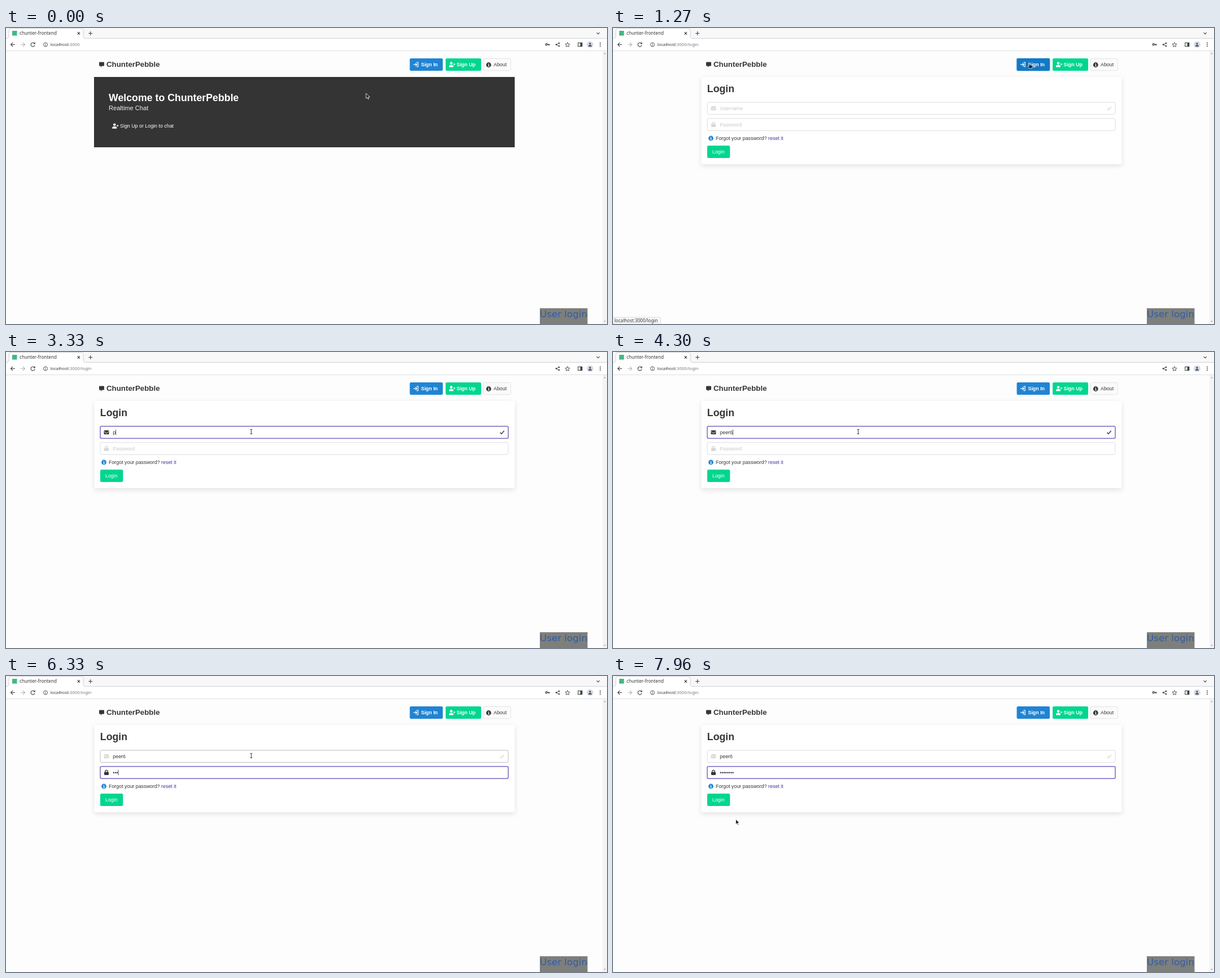
An HTML page for the animation above (7990 ms loop, 1065 by 526 pixels).

```html
<!DOCTYPE html>
<html lang="en">
<head>
<meta charset="utf-8">
<title>chunter-frontend</title>
<style>
  html, body { margin: 0; width: 100%; height: 100%; overflow: hidden; background: #fdfdfd; }
  svg { display: block; width: 100vw; height: 100vh; }
  text { font: 8.875px "Liberation Sans", Arial, sans-serif; fill: #363636; white-space: pre; }
  .ui { font-family: "Noto Sans", "Open Sans", sans-serif; }
  .b { font-weight: bold; }
  .w { fill: #fff; }
  .h1 { font-size: 17.75px; font-weight: bold; }
  .hint { fill: #c9c9c9; }
  .line { fill: none; stroke: #3c4043; stroke-width: 1.1; }
  .card { fill: #fff; filter: drop-shadow(0 3.5px 4.2px rgba(10,10,10,.11)); }
  .field { fill: #fff; }
</style>
</head>
<body>
<svg viewBox="0 0 1065 526" preserveAspectRatio="none">
  <defs>
    <g id="person">
      <circle cx="4" cy="2.3" r="2.3"/>
      <path d="M0 9.2V8.2Q0 5.4 2.8 5.4H5.2Q8 5.4 8 8.2V9.2Z"/>
    </g>
    <g id="personPlus">
      <use href="#person"/>
      <path d="M9.4 2.4V6M7.6 4.2H11.2" stroke="currentColor"/>
    </g>
    <g id="info">
      <circle r="4.4"/>
      <path d="M-1.1-.5H.3V2.3M-1.2 2.3H1.4M-.6-2.3H.6" fill="none" stroke="#fff" stroke-width="1.1"/>
    </g>
  </defs>

  <!-- browser chrome -->
  <rect width="1065" height="19" fill="#f8f8f9"/>
  <rect y="18" width="1065" height="22.5" fill="#fff"/>
  <path d="M0 18.4H1Q5 18.4 5 14V4.500Q5 .6 9 .6H133Q137 .6 137 4.500V14Q137 18.4 141 18.4H1065" fill="#fff" stroke="#c9cbd2" stroke-width=".9"/>
  <path d="M0 40.500H1065" stroke="#dcdde0"/>
  <rect x="11" y="5" width="8.500" height="8.500" fill="#41b883"/>
  <text class="ui" x="24" y="12.2" style="font-size:8.15px">chunter-frontend</text>
  <g class="line">
    <path d="M126.600 7.200L131 11.600M131 7.200L126.600 11.600M149.700 6V13M146.200 9.500H153.200M1046.800 8.200L1049.300 10.700L1051.800 8.200"/>
    <path d="M16 29.500H8.500M12 26L8.500 29.500L12 33"/>
    <path d="M26 29.500H33.500M30 26L33.500 29.500L30 33" stroke="#b4b6b9"/>
    <path d="M50.300 27.300A3.500 3.500 0 1 0 51 30.500M51.200 25.500V28H48.700"/>
    <circle cx="70" cy="29.500" r="3.500" stroke-width=".9"/>
    <path d="M70 28.900V31.700M70 27.300V28.200" stroke-width=".9"/>
    <path d="M980 27L975 29.500L980 32" stroke-width=".9"/>
    <path d="M995 25.600L996.200 28.300L999 28.600L996.900 30.500L997.500 33.300L995 31.900L992.500 33.300L993.100 30.500L991 28.600L993.800 28.300Z" stroke-width=".9"/>
    <rect x="1013.800" y="26.300" width="7" height="6.400"/>
  </g>
  <g fill="#3c4043">
    <circle cx="975" cy="29.500" r="1.300"/><circle cx="980" cy="27" r="1.300"/><circle cx="980" cy="32" r="1.300"/>
    <rect x="1017.600" y="26" width="3.500" height="7"/>
    <circle cx="1035" cy="29.500" r="6" fill="#d9dce3"/>
    <use href="#person" transform="translate(1032 26.200) scale(.74)" fill="#4a5168"/>
    <circle cx="1053" cy="26.500" r=".9"/><circle cx="1053" cy="29.500" r=".9"/><circle cx="1053" cy="32.500" r=".9"/>
  </g>
  <g id="key" class="line">
    <circle cx="957.700" cy="29.300" r="1.600" stroke-width="1.300"/>
    <path d="M959.300 29.300H963.500M962.300 29.300V31.300" stroke-width="1.500"/>
  </g>
  <text class="ui" x="78.500" y="32.200" style="font-size:7.7px">localhost<tspan id="path" fill="#777b80"></tspan></text>

  <!-- scrollbar -->
  <rect x="1057" y="41" width="8" height="485" fill="#f4f4f4"/>
  <path d="M1059 46.300L1061 44L1063 46.300ZM1059 520.500L1061 522.800L1063 520.500Z" fill="#a3a3a3"/>

  <!-- navigation -->
  <path d="M166 60.500H173Q174 60.500 174 61.500V66.500Q174 67.500 173 67.500H170.500L167.800 69.600V67.500H166Q165 67.500 165 66.500V61.500Q165 60.500 166 60.500Z" fill="#363636"/>
  <text class="b" x="178" y="69.400" style="font-size:13.3px">ChunterPebble</text>
  <rect id="signIn" x="715.500" y="54" width="58.500" height="22" rx="2.200"/>
  <path d="M722 64.900H728M725.600 62.300L728.200 64.900L725.600 67.500M727.500 61.200H730.200V68.600H727.500" fill="none" stroke="#fff" stroke-width="1.200"/>
  <text class="b w" x="735.500" y="67.900">Sign In</text>
  <rect x="779" y="54" width="63" height="22" rx="2.200" fill="#00d68f"/>
  <use href="#personPlus" x="785" y="60.300" fill="#fff" color="#fff"/>
  <text class="b w" x="798.500" y="67.900">Sign Up</text>
  <rect x="846.500" y="54.300" width="48" height="21.400" rx="2.200" fill="#fbfbfb" stroke="#dedede" stroke-width=".8"/>
  <use href="#info" x="855.300" y="65.500" fill="#363636"/>
  <text x="864" y="68.200">About</text>

  <g id="home">
    <rect x="156" y="87" width="745.500" height="125" fill="#343434"/>
    <text class="h1 w" x="182" y="130">Welcome to ChunterPebble</text>
    <text x="182" y="146.400" style="font-size:11.1px;fill:#eee">Realtime Chat</text>
    <use href="#personPlus" x="188.300" y="169.500" fill="#fff" color="#fff"/>
    <text class="w" x="202" y="177.200">Sign Up or Login to chat</text>
  </g>

  <g id="login">
    <rect class="card" x="156.500" y="87" width="745" height="155" rx="3"/>
    <text class="h1" x="166.800" y="114.300">Login</text>
    <rect class="field" id="userBox" x="167" y="132" width="723" height="21.500" rx="2.200"/>
    <g id="userIcon">
      <rect x="173.500" y="139.300" width="9" height="7" rx="1"/>
      <path d="M173.500 141L178 144.300L182.500 141" fill="none" stroke="#fff" stroke-width=".9"/>
      <path d="M875.500 143L878 145.500L882.700 140" fill="none" stroke="currentColor" stroke-width="1.400"/>
    </g>
    <text id="userText" x="189.300" y="146"></text>
    <rect class="field" id="passBox" x="167" y="160.800" width="723" height="21.500" rx="2.200"/>
    <g id="passIcon">
      <rect x="174" y="170.600" width="8" height="5.400" rx="1"/>
      <path d="M175.800 171V169.500A2.200 2.200 0 0 1 180.200 169.500V171" fill="none" stroke="currentColor" stroke-width="1.200"/>
    </g>
    <text id="passText" x="189.300" y="174.700"></text>
    <rect id="caret" width=".8" height="9.600" fill="#222"/>
    <use href="#info" x="173.500" y="196" fill="#2084d3"/>
    <text x="182" y="198.800">Forgot your password? <tspan fill="#472fa5">reset it</tspan></text>
    <rect x="167" y="209" width="40.300" height="22" rx="2.200" fill="#00d68f"/>
    <text class="w" x="176" y="223.100">Login</text>
  </g>

  <g id="status">
    <path d="M0 514H82Q84.500 514 84.500 516.500V526H0Z" fill="#f8f8f8" stroke="#d4d4d4" stroke-width=".8"/>
    <text class="ui" x="2.500" y="522.700" style="font-size:8.1px">localhost:3000/login</text>
  </g>
  <rect x="946" y="498" width="84.500" height="28" fill="#7e7f7b"/>
  <text x="946" y="513.500" style="font:16.7px 'DejaVu Sans',sans-serif;fill:#315da3">User login</text>

  <!-- pointers, hot spot at the origin -->
  <g id="arrow"><path d="M0 0V9.200L2.200 7.300L3.700 10.500L5.200 9.800L3.700 6.800L6.500 6.500Z" fill="#222" stroke="#fff" stroke-width=".8"/></g>
  <g id="beam"><path d="M-1.800-4H-.5Q0-4 0-3.500Q0-4 .5-4H1.800M0-3.500V3.500M-1.800 4H1.800" fill="none" stroke="#343450" stroke-width="1"/></g>
  <g id="hand"><path d="M-.9 0Q0-1 .9 0V3.500L4.300 4.200Q5.300 4.600 5.200 5.700L4.500 9.800H-.5L-3 6.300Q-2.800 5-.9 6.200Z" fill="#222" stroke="#fff" stroke-width=".7"/></g>
</svg>
<script>
const LOOP = 7990, OPEN = 1000, USER_FOCUS = 2750, PASS_FOCUS = 4750;
const USER = "peer6";
const userKeys = [3300, 3500, 3720, 3920, 4130];
const passKeys = [5700, 5990, 6240, 6450, 6630, 6800, 6970, 7140];
// time, x, y
const path = [[0, 638, 116], [800, 738, 62], [1450, 738, 62], [2300, 434.5, 141.5],
              [7250, 434.5, 141.5], [7990, 216.5, 255]];

const el = id => document.getElementById(id);
const show = (id, on) => el(id).style.display = on ? "" : "none";
const set = (id, attrs) => { for (const k in attrs) el(id).setAttribute(k, attrs[k]); };
const typed = (keys, t) => keys.filter(k => k <= t).length;

function pointer(t) {
  const i = path.findIndex(p => p[0] > t);
  const [t0, x0, y0] = path[i - 1], [t1, x1, y1] = path[i];
  const u = (t - t0) / (t1 - t0), e = u * u * (3 - 2 * u);
  return [x0 + (x1 - x0) * e, y0 + (y1 - y0) * e];
}

function field(name, text, hint, focused, hovered) {
  set(name + "Box", {
    stroke: focused ? "#7668c4" : hovered ? "#b5b5b5" : "#dbdbdb",
    "stroke-width": focused ? 1.5 : .9
  });
  const color = focused ? "#363636" : "#d8d8d8";
  set(name + "Icon", { fill: color, color });
  el(name + "Text").textContent = text || hint;
  set(name + "Text", { class: text ? "" : "hint" });
}

function draw(t) {
  const [x, y] = pointer(t);
  const inside = (l, top, r, b) => x >= l && x <= r && y >= top && y <= b;
  const open = t >= OPEN;
  const onSignIn = inside(715, 54, 774, 76);
  const onUser = open && inside(167, 132, 890, 153.5);
  const onPass = open && inside(167, 161, 890, 182.5);
  const onUserField = t >= USER_FOCUS && t < PASS_FOCUS, onPassField = t >= PASS_FOCUS;
  const nUser = typed(userKeys, t), nPass = typed(passKeys, t);

  show("home", !open);
  show("login", open);
  show("status", onSignIn);
  show("key", !nUser || nPass);
  el("path").textContent = open ? ":3000/login" : ":3000";
  set("signIn", {
    fill: onSignIn ? "#1279c7" : "#2084d3",
    stroke: open && t < USER_FOCUS ? "rgba(32,132,211,.4)" : "none",
    "stroke-width": 1.6
  });

  field("user", USER.slice(0, nUser), "Username", onUserField, onUser);
  field("pass", "•".repeat(nPass), "Password", onPassField, onPass);

  const name = onPassField ? "pass" : "user", count = onPassField ? nPass : nUser;
  const since = Math.max(onPassField ? PASS_FOCUS : USER_FOCUS,
                         ...(onPassField ? passKeys : userKeys).filter(k => k <= t));
  show("caret", t >= USER_FOCUS && (t - since) % 1000 < 500);
  set("caret", {
    x: 189.3 + (count ? el(name + "Text").getComputedTextLength() : 0),
    y: onPassField ? 166.7 : 138
  });

  const kind = onSignIn ? "hand" : onUser || onPass ? "beam" : "arrow";
  for (const id of ["hand", "beam", "arrow"]) show(id, id === kind);
  set(kind, { transform: `translate(${x} ${y})` });
}

const start = performance.now();
function tick() {
  draw((performance.now() - start) % LOOP);
  requestAnimationFrame(tick);
}
tick();
</script>
</body>
</html>
```
